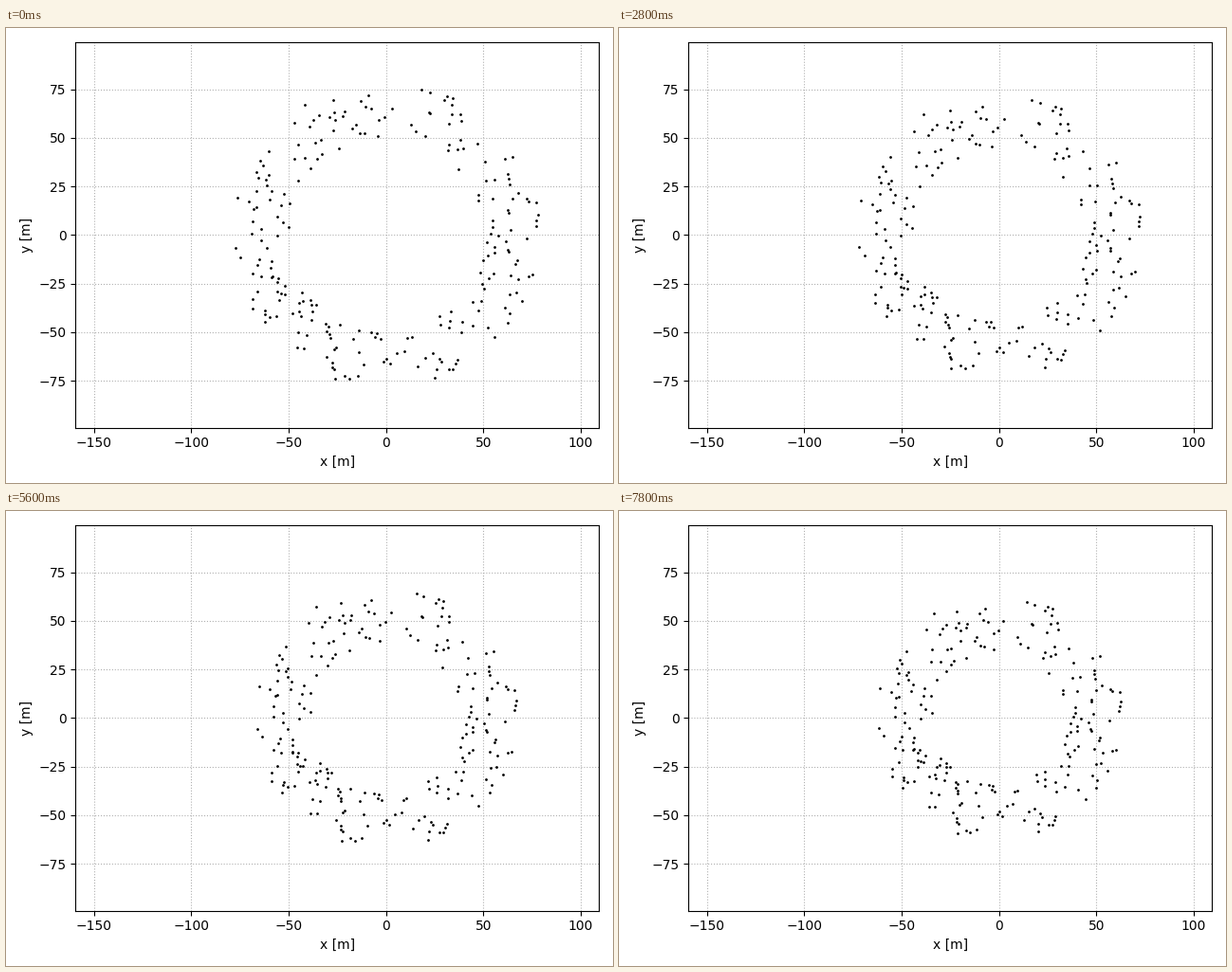
Animation, 640 px wide and 480 px high, one loop 8000 ms. Source, as a matplotlib script:

```python
import numpy as np
import matplotlib.pyplot as plt
from matplotlib.animation import FuncAnimation

W, H, DPI = 640, 480, 100
FRAMES, INTERVAL = 40, 200
PEOPLE = 230
STEP = 0.4                  # metres walked towards the centre per frame
R_MIN, R_MAX = 50, 79       # ring at the start

# How crowded the ring is: (direction in degrees, relative density).
DENSITY = [(0, 12), (25, 11), (37, 3), (70, 13), (83, 0), (97, 10),
           (128, 11), (142, 3), (157, 14), (187, 7), (217, 18), (232, 8),
           (247, 14), (278, 5), (292, 11), (322, 7), (340, 13), (360, 12)]


def make_crowd(n):
    """One random person per equal share of the crowd and of the ring's width."""
    rng = np.random.default_rng(7)
    degrees = np.arange(361)
    share = np.cumsum(np.interp(degrees, *zip(*DENSITY)))
    share = (share - share[0]) / (share[-1] - share[0])
    angle = np.interp((np.arange(n) + rng.random(n)) / n, share, degrees)
    radius = R_MIN + (R_MAX - R_MIN) * (rng.permutation(n) + rng.random(n)) / n
    return np.radians(angle), radius


angle, radius = make_crowd(PEOPLE)

fig, ax = plt.subplots(figsize=(W / DPI, H / DPI), dpi=DPI)
ax.set_xlim(-159.47, 109.27)
ax.set_ylim(-99.2, 99.2)
ax.set_xticks(range(-150, 101, 50))
ax.set_yticks(range(-75, 76, 25))
ax.set_xlabel("x [m]")
ax.set_ylabel("y [m]")
ax.grid(linestyle=":")
fig.tight_layout()
dots, = ax.plot([], [], "k.", markersize=2)


def update(i):
    r = radius - STEP * i
    dots.set_data(r * np.cos(angle), r * np.sin(angle))
    return dots,


anim = FuncAnimation(fig, update, frames=FRAMES, interval=INTERVAL, repeat=True)
plt.show()
```
